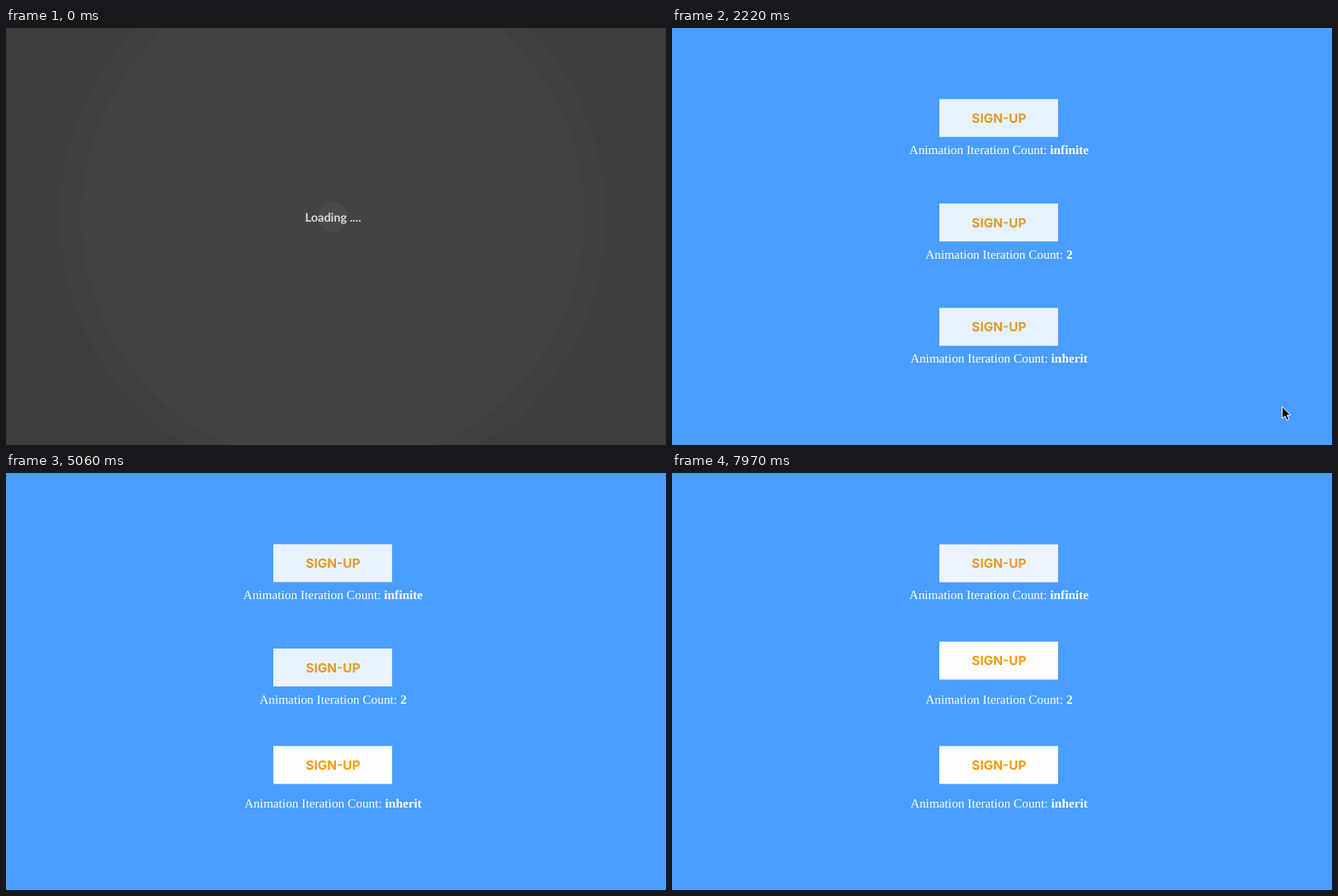
These frames come from a looping animation (800 px wide and 506 px high, 8000 ms). An HTML page:

```html
<!DOCTYPE html>
<html lang="en">
<head>
<meta charset="utf-8">
<title>Animation iteration count</title>
<style>
  html, body { margin: 0; width: 100%; height: 100%; overflow: hidden; background: #499eff; }
  svg { display: block; width: 800px; height: 506px; }
  text { text-anchor: middle; text-rendering: geometricPrecision; }
  .label { font: 15.33px "Liberation Serif", Times, serif; fill: #fff; }
  .label tspan { font-weight: 700; }
  .button text { font: 700 15.4px Inter, sans-serif; fill: #f79a0b; }
  .loading { font: 700 14.5px Lato, sans-serif; fill: #d8d8d8; }
</style>
</head>
<body>
<svg viewBox="0 0 800 506">
  <g id="page">
    <rect width="800" height="506" fill="#499eff"/>
    <g id="rows"></g>
    <path id="cursor" d="M0 0V14.2L3.3 11.2 5.5 16.3 8.2 15.2 6 10.2H10.2Z" stroke="#fff" stroke-width="1"/>
  </g>
  <g id="loader">
    <rect width="800" height="506" fill="#3d3d3d"/>
    <circle cx="396" cy="229" fill="#3f4140"/>
    <circle cx="396" cy="229" fill="#434343"/>
    <circle cx="396" cy="229" fill="#4a4a4a"/>
    <text class="loading" x="396.5" y="235">Loading ....</text>
  </g>
</svg>
<script>
const LOOP = 8000, PAGE_AT = 610, START = 560, PERIOD = 2805, DROP = 9.4;
const $ = id => document.getElementById(id);
const clamp = x => Math.min(1, Math.max(0, x));
const smooth = x => x * x * (3 - 2 * x);

$('rows').innerHTML = ['infinite', '2', 'inherit'].map((count, i) => `
  <g class="button">
    <rect x="324" width="144" height="46" fill="#fdfeff"/>
    <text x="396.4" y="28.7">SIGN-UP</text>
  </g>
  <text class="label" x="396.4" y="${152.8 + i * 126.7}">Animation Iteration Count: <tspan>${count}</tspan></text>`).join('');

const buttons = document.querySelectorAll('.button');
const rings = document.querySelectorAll('#loader circle');
const limits = [Infinity, 2, 1];

// The CSS "ease" curve: cubic-bezier(.25, .1, .25, 1)
function ease(x) {
  const curve = (a, b, s) => 3 * a * s * (1 - s) ** 2 + 3 * b * s * s * (1 - s) + s ** 3;
  let lo = 0, hi = 1;
  for (let i = 0; i < 24; i++) {
    const mid = (lo + hi) / 2;
    if (curve(.25, .25, mid) < x) lo = mid; else hi = mid;
  }
  return curve(.1, 1, lo);
}

// Pointer stops: time, x, y
const stops = [[700, 713, 262], [1250, 655, 219], [1600, 655, 219], [1950, 751, 330], [2370, 735, 512]];

function pointer(t) {
  let i = 0;
  while (i < stops.length - 2 && t > stops[i + 1][0]) i++;
  const [t0, x0, y0] = stops[i], [t1, x1, y1] = stops[i + 1];
  const k = smooth(clamp((t - t0) / (t1 - t0)));
  return `translate(${x0 + (x1 - x0) * k} ${y0 + (y1 - y0) * k})`;
}

function draw(t) {
  $('loader').style.display = t < PAGE_AT ? '' : 'none';
  const grow = Math.min(t, 310);
  [330 + grow * .2, 305 + grow * .2, 18 + grow * .35].forEach((r, i) => rings[i].setAttribute('r', r));

  const turn = Math.max(0, (t - START) / PERIOD);
  buttons.forEach((button, i) => {
    const active = turn < limits[i], k = active ? ease(turn % 1) : 0;
    button.setAttribute('opacity', active ? k : 1);
    button.setAttribute('transform', `translate(0 ${78 + i * 126.65 + DROP * k})`);
  });
  $('cursor').setAttribute('transform', pointer(t));
}

const begin = performance.now();
function tick() {
  draw((performance.now() - begin) % LOOP);
  requestAnimationFrame(tick);
}
tick();
</script>
</body>
</html>
```
